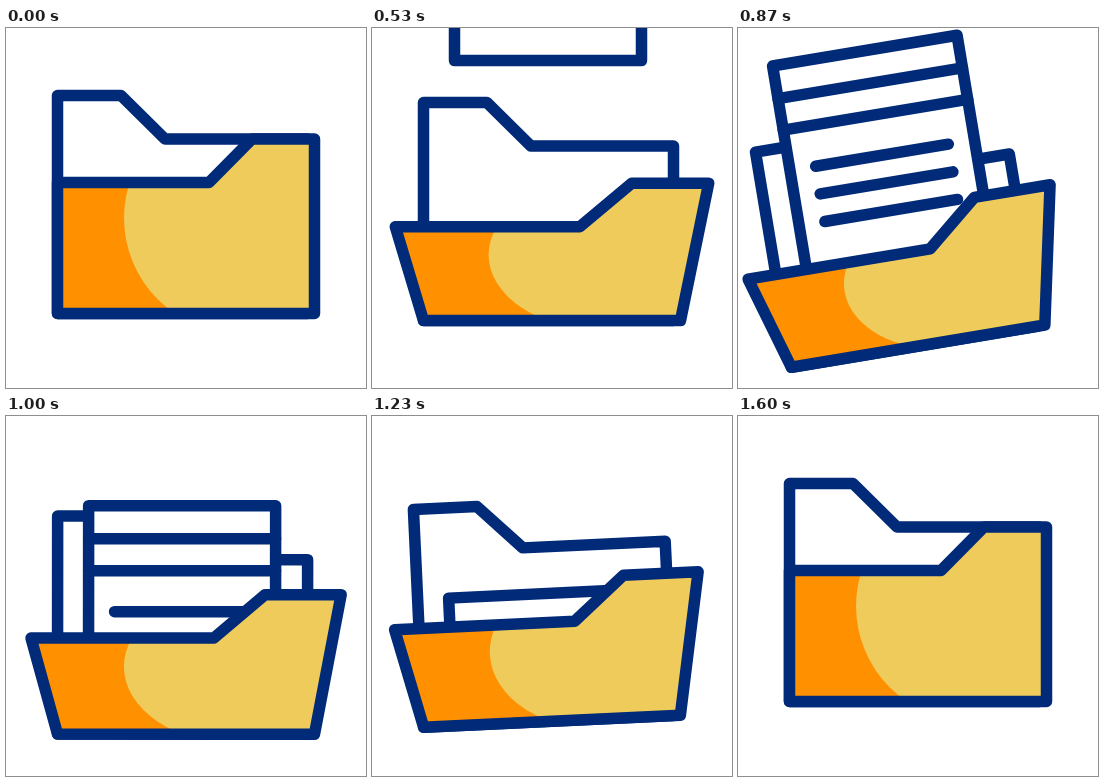
Animation, 360 px wide and 360 px high, one loop 2 s. Source, as an HTML page:

```html
<!DOCTYPE html>
<html lang="en">
<head>
<meta charset="utf-8">
<title>Folder</title>
<style>
  html, body { margin: 0; width: 100%; height: 100%; overflow: hidden; background: #fff; }
  svg { display: block; width: 100vw; height: 100vh; }
  .line { fill: none; stroke: #012a78; stroke-width: 11.5; stroke-linecap: round; stroke-linejoin: round; }
  .paper { fill: #fff; }
</style>
</head>
<body>
<svg viewBox="0 0 360 360">
  <defs>
    <clipPath id="inside"><rect x="0" y="-400" width="360" height="685"/></clipPath>
    <clipPath id="frontClip"><path id="frontShape"/></clipPath>
  </defs>
  <g id="folder">
    <path class="line paper" d="M51.5 285.5V67.5H115L159 111H301.5V285.5Z"/>
    <g clip-path="url(#inside)">
      <g id="sheet">
        <rect class="line paper" x="82.5" width="187" height="212"/>
        <path class="line" d="M82.5 33h187m-187 32h187M108.5 106h134.5m-134.5 28h134.5m-134.5 28h134.5"/>
      </g>
    </g>
    <g clip-path="url(#frontClip)">
      <rect width="360" height="360" fill="#ff9100"/>
      <path id="glow" fill="#efcb5b"/>
    </g>
    <path id="frontLine" class="line"/>
  </g>
</svg>
<script>
const LOOP = 2000;
const $ = id => document.getElementById(id);
const folder = $('folder'), sheet = $('sheet'), glow = $('glow');
const frontShape = $('frontShape'), frontLine = $('frontLine');

// Front panel: the top edge sinks and widens as it opens
function frontPath(open) {
  const y = 37.5 * open, wide = 28.5 * open;
  return `M${51.5 - wide} ${154.5 + y}H${203 + 5 * open}L${246 + 14 * open} ${111 + y}`
    + `H${308.5 + wide}L308.5 285.5H51.5Z`;
}

// Area to the right of an arc that flattens as the panel opens
function glowPath(open, shift) {
  const x = 233 - 1.5 * open + shift, y = 190 + 30 * open, r = 115 - 40 * open;
  return `M${x} ${y + r}A115 ${r} 0 0 1 ${x} ${y - r}H400V${y + r}Z`;
}

function draw(ms) {
  // Motion is stepped at 30 per second on a 10 ms clock
  const n = Math.ceil((Math.floor(ms / 10) + 1) * 0.3 - 1e-6) - 1;

  // Smooth 0 to 1 between two steps
  const ramp = (a, b) => {
    const x = Math.min(1, Math.max(0, (n - a) / (b - a)));
    return (1 - Math.cos(Math.PI * x)) / 2;
  };

  const open = 1.03 * ramp(0, 18.3) - 0.1 * ramp(22, 31) - 0.93 * ramp(34.6, 48);
  const drop = 32.6 * (ramp(12, 25) - ramp(30.5, 45.5));
  const tilt = -10 * ramp(18.3, 25) + 15 * ramp(25, 33.2) - 7.8 * ramp(33.2, 37.3) + 2.8 * ramp(37.3, 43);
  const shift = 4.3 * (ramp(26, 37) - ramp(37, 48));
  const slide = 472 * ramp(5, 45) - 269.2;

  const front = frontPath(open);
  frontShape.setAttribute('d', front);
  frontLine.setAttribute('d', front);
  glow.setAttribute('d', glowPath(open, shift));
  sheet.setAttribute('transform', `translate(0 ${slide})`);
  folder.setAttribute('transform', `translate(0 ${drop}) rotate(${tilt} 180 285)`);
}

let start;
function tick(now) {
  start ??= now;
  draw((now - start) % LOOP);
  requestAnimationFrame(tick);
}
draw(0);
requestAnimationFrame(tick);
</script>
</body>
</html>
```
